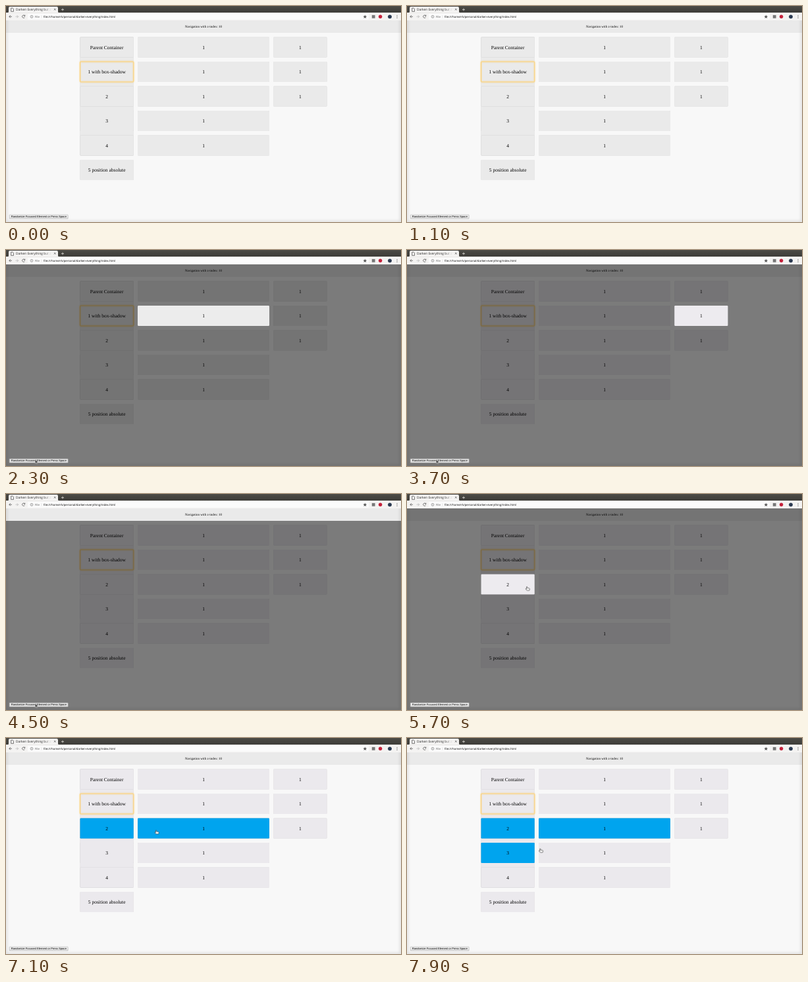
Animation of 600 by 330 pixels, one loop 8 s. Source, as an HTML page:

```html
<!DOCTYPE html>
<html lang="en">
<head>
<meta charset="utf-8">
<title>Darken everything</title>
<style>
  html, body { margin: 0; width: 100%; height: 100%; overflow: hidden; background: #f8f8f8; }
  svg { display: block; width: 600px; height: 330px; }
  text { fill: #000; text-rendering: geometricPrecision; }
  .page text { font-family: "Liberation Serif", serif; font-size: 7.5px; text-anchor: middle; }
  .page .nav text { font-size: 5px; }
  .ui { font-family: "Open Sans", sans-serif; font-size: 4.3px; }
  .button { font: 4.167px "Liberation Sans", sans-serif; text-anchor: middle; }
  .cell { filter: drop-shadow(0 0 .5px rgba(0, 0, 0, .16)); }
  .icon { fill: none; stroke: #5a5a5a; stroke-width: .8; }
</style>
</head>
<body>
<svg id="stage" viewBox="0 0 600 330">
  <defs>
    <linearGradient id="bar" x2="0" y2="1">
      <stop stop-color="#4c4b46"/><stop offset="1" stop-color="#3d3c38"/>
    </linearGradient>
    <linearGradient id="fade">
      <stop offset=".78" stop-color="#222"/><stop offset="1" stop-color="#222" stop-opacity="0"/>
    </linearGradient>
    <linearGradient id="face" x2="0" y2="1">
      <stop stop-color="#f2f2f2"/><stop offset="1" stop-color="#dedede"/>
    </linearGradient>
    <filter id="soft" x="-5%" y="-5%" width="110%" height="110%"><feGaussianBlur stdDeviation="2"/></filter>
    <clipPath id="view"><rect y="22" width="600" height="308"/></clipPath>
  </defs>

  <rect y="22" width="600" height="308" fill="#f8f8f8"/>
  <g class="page" id="page"></g>
  <rect id="shade" y="22" width="600" height="308" opacity="0"/>
  <g class="page" id="lit"></g>
  <g clip-path="url(#view)">
    <rect y="10" width="600" height="320" fill="none" stroke="#000" stroke-opacity=".13" stroke-width="3" filter="url(#soft)"/>
  </g>

  <g class="button">
    <rect id="key" x="5.2" y="319" width="89" height="6" rx=".6" fill="url(#face)" stroke="#a8a8a8" stroke-width=".5"/>
    <text x="49.7" y="323.4">Randomize Focused Element or Press Space</text>
  </g>

  <g class="ui">
    <rect width="600" height="10.5" fill="url(#bar)"/>
    <path d="M2 10.5Q4 10.5 4 8.5V3Q4 1 6 1H77Q79 1 79 3V8.5Q79 10.5 81 10.5Z" fill="#f4f3f2"/>
    <path d="M7.7 3.2h2.6l1.2 1.2v4H7.7z" class="icon" stroke-width=".5"/>
    <text x="15" y="7" font-size="4.8" style="fill:url(#fade)">Darken Everything but a</text>
    <path d="M73 4l2.6 2.6M75.600 4l-2.600 2.600" class="icon"/>
    <path d="M84 5.500h4M86 3.500v4" class="icon" style="stroke:#d8d6d0"/>
    <rect y="10.200" width="600" height="11.800" fill="#f4f3f2"/>
    <rect x="33" y="11.800" width="518" height="9" rx="1" fill="#fbfbfb"/>
    <path d="M9 16.200H4.800M6.800 14.200l-2 2 2 2" class="icon"/>
    <path d="M14.500 16.200h4.200M16.700 14.200l2 2-2 2" class="icon" style="stroke:#b8b8b8"/>
    <path d="M28.500 15a2.100 2.100 0 1 0 .1 2M28.800 13.600v1.700h-1.700" class="icon"/>
    <circle cx="39" cy="16.300" r="2" class="icon" style="stroke-width:.5"/>
    <path d="M39 15.800v1.600M39 14.800v.5" class="icon" style="stroke-width:.5"/>
    <text x="44" y="17.900" style="fill:#555">File</text>
    <path d="M53.800 14v4.500" class="icon" style="stroke:#ccc;stroke-width:.4"/>
    <text x="57" y="17.900">file:///home/rk/personal/darken-everything/index.html</text>
    <path d="M545.300 13.500l.8 1.900 2 .2-1.500 1.300.5 2-1.800-1.100-1.800 1.100.5-2-1.500-1.300 2-.2z" fill="#555"/>
    <rect x="555.800" y="13.900" width="4.800" height="4.800" fill="#777"/>
    <circle cx="568.600" cy="16.300" r="2.700" fill="#c4203a"/>
    <circle cx="583" cy="16.300" r="2.900" fill="#2c3b52"/>
    <path d="M594 14v1M594 15.900v1M594 17.800v1" class="icon" style="stroke-width:1"/>
  </g>

  <g id="cursor">
    <path id="arrow" d="M0 0V5.600L1.300 4.500 2.200 6.600 3.100 6.200 2.200 4.200H4Z" fill="#222" stroke="#fff" stroke-width=".4"/>
    <path id="hand" d="M-.5.6Q0-.2.600.5L.9 2.300 3.600 2.800Q4.600 3 4.400 4.200L3.800 6H.2L-1.700 3.900Q-1.900 3 -.9 3.200L-.2 3.700Z" fill="#fff" stroke="#222" stroke-width=".6" stroke-linejoin="round"/>
  </g>
</svg>
<script>
const LOOP = 8000, STEP = 100;
const $ = id => document.getElementById(id);
const columns = [[112.5, 81.3], [200, 200], [406.200, 81.3]];
const rowTop = row => 47.5 + row * 37.5;
const CELL_H = 31;

function add(parent, tag, attrs, text = '') {
  const el = document.createElementNS('http://www.w3.org/2000/svg', tag);
  for (const name in attrs) el.setAttribute(name, attrs[name]);
  el.textContent = text;
  return parent.appendChild(el);
}

const labels = ['Parent Container', '1 with box-shadow', '2', '3', '4', '5 position absolute'];
const label = (col, row) => col ? '1' : labels[row];

function cell(parent, col, row, fill) {
  const [x, width] = columns[col], y = rowTop(row);
  const g = add(parent, 'g', {});
  const attrs = { class: 'cell', x, y, width, height: CELL_H, rx: 1.2 };
  if (fill) attrs.fill = fill;
  add(g, 'rect', attrs);
  add(g, 'text', { x: x + width / 2, y: y + 18 }, label(col, row));
  return g;
}

function navBar(parent) {
  const g = add(parent, 'g', { class: 'nav' });
  add(g, 'rect', { class: 'cell', y: 22, width: 600, height: 19, fill: '#eaeaea' });
  add(g, 'text', { x: 300, y: 33.3 }, 'Navigation with z-index: 10');
  return g;
}

// Hard-stepped track of [time, value] pairs
function track(el, prop, steps) {
  const frames = steps.map(([time, value]) => ({ offset: time / LOOP, [prop]: value, easing: 'step-end' }));
  frames.push({ offset: 1, [prop]: steps[steps.length - 1][1] });
  el.animate(frames, { duration: LOOP, iterations: Infinity }).startTime = start;
}
const show = (el, from, to = LOOP) =>
  track(el, 'opacity', [[0, 0], [from, 1], ...(to < LOOP ? [[to, 0]] : [])]);

const start = document.timeline.currentTime || 0;

const page = $('page'), lit = $('lit');
navBar(page);
const cells = add(page, 'g', { fill: '#eaeaea' });
add(cells, 'rect', { class: 'cell', x: 112.5, y: 47.5, width: 81.3, height: 181, rx: 1.2 });
const places = [6, 5, 3].flatMap((count, col) => Array.from({ length: count }, (_, row) => [col, row]));
places.forEach(([col, row]) => cell(cells, col, row));
add(cells, 'rect', {
  x: 112.5, y: 85, width: 81.3, height: CELL_H, rx: 1, fill: 'none', stroke: '#ffcf66',
  'stroke-width': .8, style: 'filter:drop-shadow(0 0 .8px #ffc64d)'
});
track(cells, 'fill', [[0, '#eaeaea'], [2400, '#ebe9ed']]);

show($('shade'), 2300, 6100);
track($('shade'), 'fillOpacity', [[0, .5]]);
show(cell(lit, 1, 1, '#ececec'), 2300, 3200);
show(cell(lit, 2, 1, '#edebef'), 3200, 3900);
show(navBar(lit), 3900, 4700);
show(cell(lit, 0, 2, '#edebef'), 4700, 6100);

const BLUE = '#00a4ee';
[[0, 2, 6100], [1, 2, 7000], [0, 3, 7700]].forEach(([col, row, time]) => show(cell(lit, col, row, BLUE), time));

track($('key'), 'fill', [
  [0, 'url(#face)'], [2100, '#e2e2e2'], [2400, 'url(#face)'], [3100, '#e2e2e2'], [3200, 'url(#face)'],
  [3700, '#e2e2e2'], [3900, 'url(#face)'], [4500, '#e2e2e2'], [4700, 'url(#face)']
]);

// Each move: start, end, from, bend, to
const button = [44.5, 320.3], two = [182, 141.3], wide = [236, 140], three = [180, 162];
const moves = [
  [1000, 1700, [-8, 288], [14, 312], button],
  [4800, 5700, button, [330, 250], two],
  [6100, 6900, two, [205, 150], wide],
  [7000, 7500, wide, [195, 142], three],
  [7600, 7700, three, [181, 175], [182, 186]],
  [7700, 7900, [182, 186], [192, 180], [202.2, 168.8]]
];

function cursorAt(time) {
  const [from, to, a, b, c] = moves.filter(move => move[0] <= time).pop() || moves[0];
  const p = Math.min(1, Math.max(0, (time - from) / (to - from)));
  const u = p * p * (3 - 2 * p);
  return a.map((v, i) => v * (1 - u) ** 2 + 2 * b[i] * u * (1 - u) + c[i] * u * u);
}

const overCell = ([x, y]) => places.some(([col, row]) => {
  const [left, width] = columns[col], top = rowTop(row);
  return x >= left && x <= left + width && y >= top && y <= top + CELL_H;
});

const times = Array.from({ length: LOOP / STEP }, (_, i) => i * STEP);
track($('cursor'), 'transform', times.map(t => {
  const [x, y] = cursorAt(t);
  return [t, `translate(${x}px, ${y}px)`];
}));
track($('arrow'), 'opacity', times.map(t => [t, overCell(cursorAt(t)) ? 0 : 1]));
track($('hand'), 'opacity', times.map(t => [t, overCell(cursorAt(t)) ? 1 : 0]));
</script>
</body>
</html>
```
